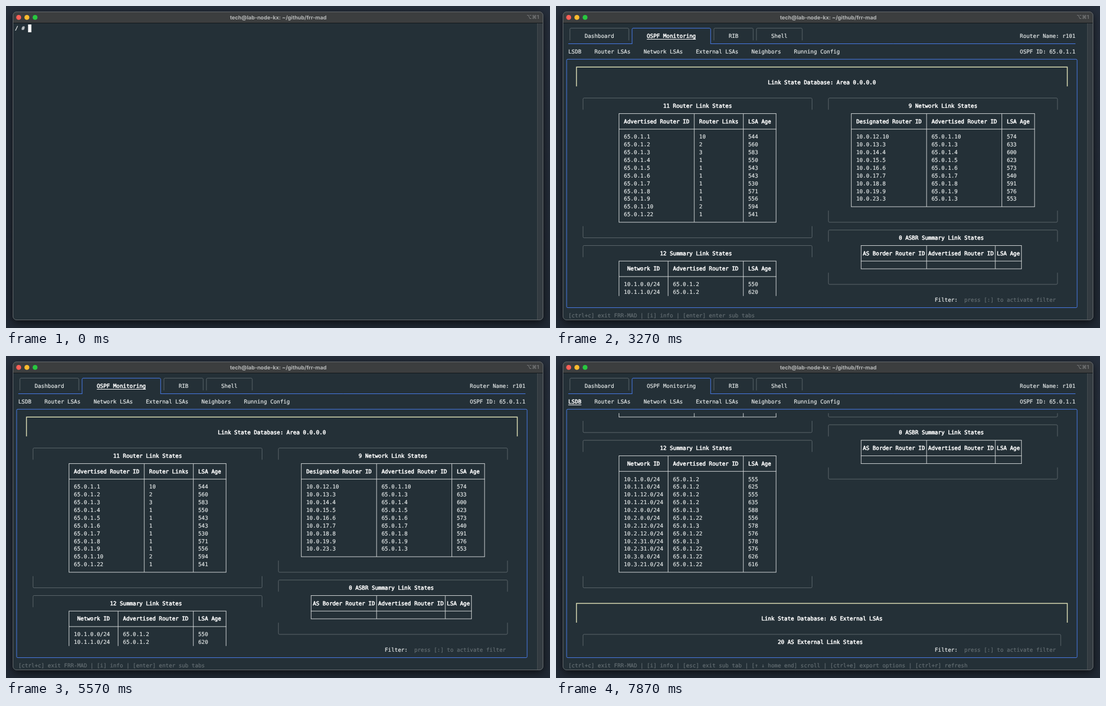
Recreate the animation shown at these times as an HTML page with a canvas. Size 972 by 576 pixels, loop 8 s.

```html
<!DOCTYPE html>
<html lang="en">
<head>
<meta charset="utf-8">
<title>Terminal dashboard</title>
<style>
html, body { margin: 0; width: 100%; height: 100%; overflow: hidden; background: #1c232d; }
canvas { display: block; }
</style>
</head>
<body>
<canvas id="stage" width="972" height="576"></canvas>
<script>
const ctx = document.getElementById('stage').getContext('2d');
const LOOP = 8000;
// The terminal has 8 x 19 point cells, scaled down to the stage
const PT = 972 / 1330;
const CW = 8 * PT, RH = 19 * PT, X0 = 16.1, Y0 = 39.7;
const MONO = '9.75px "DejaVu Sans Mono", monospace';
const C = {
  bg: '#243037', text: '#e6eaea', bold: '#ffffff', dim: '#636d72', box: '#5c666b',
  grid: '#d3d7d8', blue: '#4a7eee', green: '#529f5c', cream: '#dedfb6', row: '#4f92ca'
};
let scroll = 0;

// Terminal cell geometry
const left = c => X0 + c * CW;
const mid = c => left(c + 0.5);
const rowY = r => Y0 + (r - scroll) * RH;
const below = r => rowY(r + 0.5);

// Bold is the regular face with a heavier outline
function text(c, r, str, color = C.text, bold = false, underline = false) {
  const x = left(c), y = rowY(r) + 3.3;
  ctx.font = MONO;
  ctx.letterSpacing = '0px';
  ctx.letterSpacing = (CW - ctx.measureText('M').width) + 'px';
  ctx.fillStyle = ctx.strokeStyle = color;
  ctx.lineWidth = bold ? 0.55 : 0.2;
  ctx.lineJoin = 'round';
  ctx.fillText(str, x, y);
  ctx.strokeText(str, x, y);
  if (underline) ctx.fillRect(x, Math.round(rowY(r) + 5.5), str.length * CW, 1);
}
const head = (c, r, str) => text(c, r, str, C.bold, true);

function line(x1, y1, x2, y2, color) {
  ctx.strokeStyle = color;
  ctx.lineWidth = 1;
  ctx.beginPath();
  ctx.moveTo(x1, y1);
  ctx.lineTo(x2, y2);
  ctx.stroke();
}

// Three-sided frame: an edge at `edge` with legs reaching `end`
function cap(c1, c2, edge, end, color, width = 1, radius = 2) {
  const x1 = mid(c1), x2 = mid(c2);
  ctx.strokeStyle = color;
  ctx.lineWidth = width;
  ctx.lineJoin = 'miter';
  ctx.beginPath();
  ctx.moveTo(x1, end);
  ctx.arcTo(x1, edge, x2, edge, radius);
  ctx.arcTo(x2, edge, x2, end, radius);
  ctx.lineTo(x2, end);
  ctx.stroke();
}
const openBox = (c1, c2, r) => cap(c1, c2, rowY(r), below(r + 1), C.box);
const closeBox = (c1, c2, r) => cap(c1, c2, rowY(r + 1), below(r - 1), C.box);
const banner = (c1, c2, r) => cap(c1, c2, rowY(r), below(r + 2), C.cream, 1.5, 0);

function frame(c1, r1, c2, r2, color, radius) {
  ctx.strokeStyle = color;
  ctx.lineWidth = 1;
  ctx.beginPath();
  ctx.roundRect(mid(c1), rowY(r1), mid(c2) - mid(c1), rowY(r2) - rowY(r1), radius);
  ctx.stroke();
}

function table(cols, top, bottom, open = false) {
  const x1 = mid(cols[0]), x2 = mid(cols[cols.length - 1]);
  const end = open ? below(bottom) : rowY(bottom);
  for (const c of cols) line(mid(c), rowY(top), mid(c), end, C.grid);
  const rules = [rowY(top), rowY(top + 2)];
  if (!open) rules.push(end);
  for (const y of rules) line(x1 - 0.5, y, x2 + 0.5, y, C.grid);
}
const cells = (cols, r, values, draw = text, color) =>
  values.forEach((v, i) => draw(cols[i], r, String(v), color));

function clipBody() {
  ctx.beginPath();
  ctx.rect(16, Y0 + 4.5 * RH, 920, 30 * RH);
  ctx.clip();
}

// Page data
const routerLinks = '1 10 544,2 2 560,3 3 583,4 1 550,5 1 543,6 1 543,7 1 530,8 1 571,9 1 556,10 2 594,22 1 541';
const networkLinks = '12.10 10 574,13.3 3 633,14.4 4 600,15.5 5 623,16.6 6 573,17.7 7 540,18.8 8 591,19.9 9 576,23.3 3 553';
const summaryLinks = '1.0 2 550,1.1 2 620,1.12 2 550,1.21 2 630,2.0 3 583,2.0 22 551,2.12 3 573,2.12 22 571,' +
  '2.31 3 573,2.31 22 571,3.0 22 621,3.21 22 611';
const split = s => s.split(',').map(x => x.split(' '));

const routes = [
  ['0.0.0.0/0', 'kernel', '172.20.20.1 eth0', 'true', 'true', 0, 0, '01:35:55'],
  ...pair('0.0/23', 4, 49, 49),
  ...pair('2.0/24', 3, 52, 52),
  ['10.0.3.0/24', 'ospf', '10.0.12.10 eth2', 'true', 'true', 110, 20, '01:35:08'],
  ...split('12 2 13 54,13 3 11 52,14 6 10 50,15 7 12 53,16 8 13 53,17 9 50 50,18 10 11 51,19 11 54 54')
    .flatMap(([net, eth, a, b]) => pair(net + '.0/24', eth, a, b))
].slice(0, 21);

function pair(net, eth, a, b) {
  const prefix = '10.0.' + net, hop = 'eth' + eth;
  return [
    [prefix, 'ospf', hop, 'false', 'false', 110, 10, '01:35:' + a],
    [prefix, 'connected', hop, 'true', 'true', 0, 0, '01:35:' + b]
  ];
}

function dashboard() {
  frame(3, 5, 112, 7, C.green, 0);
  head(37, 6, 'All OSPF Routes are advertised as Expected');
  banner(113, 153, 5);
  head(125, 7, 'System Resources');
  openBox(115, 151, 9);
  head(128, 10, 'CPU Metrics');
  ['CPU Usage: 7.47%', 'Cores: 16', 'Memory Usage: 16.97%'].forEach((s, i) => text(118, 12 + i, s));
  banner(113, 153, 16);
  head(121, 18, 'General OSPF Information');
  ['OSPF Router ID: 65.0.1.1', 'Router Type: ASBR', 'Last SPF Execution: 1h34m42s',
    'Total External LSAs: 20', 'Attached Areas: 1'].forEach((s, i) => text(116, 20 + i, s));
  openBox(115, 151, 26);
  head(127, 27, 'Area 0.0.0.0');
  ['Full Adjencencies: 9', 'Total LSAs: 32', 'Router LSAs: 11', 'Network LSAs: 9', 'Summary LSAs: 12',
    'ASBR Summary LSAs: 0', 'NSSA External LSAs: 0'].forEach((s, i) => text(118, 28 + i, s));
}

function database(age) {
  banner(3, 153, 5);
  head(62, 7, 'Link State Database: Area 0.0.0.0');

  openBox(5, 75, 9);
  head(30, 10, '11 Router Link States');
  table([16, 39, 54, 64], 11, 25);
  cells([18, 41, 56], 12, ['Advertised Router ID', 'Router Links', 'LSA Age'], head);
  split(routerLinks).forEach(([id, n, a], i) => cells([18, 41, 56], 14 + i, ['65.0.1.' + id, n, +a + age]));
  closeBox(5, 75, 26);

  openBox(5, 75, 28);
  head(29, 29, '12 Summary Link States');
  table([16, 31, 54, 64], 30, 45);
  cells([19, 33, 56], 31, ['Network ID', 'Advertised Router ID', 'LSA Age'], head);
  split(summaryLinks).forEach(([net, id, a], i) =>
    cells([18, 33, 56], 33 + i, [`10.${net}.0/24`, '65.0.1.' + id, +a + age]));
  closeBox(5, 75, 46);

  openBox(80, 150, 9);
  head(105, 10, '9 Network Link States');
  table([87, 110, 133, 143], 11, 23);
  cells([89, 112, 135], 12, ['Designated Router ID', 'Advertised Router ID', 'LSA Age'], head);
  split(networkLinks).forEach(([net, id, a], i) =>
    cells([89, 112, 135], 14 + i, ['10.0.' + net, '65.0.1.' + id, +a + age]));
  closeBox(80, 150, 24);

  openBox(80, 150, 26);
  head(102, 27, '0 ASBR Summary Link States');
  table([90, 110, 131, 139], 28, 31);
  cells([91, 111, 132], 29, ['AS Border Router ID', 'Advertised Router ID', 'LSA Age'], head);
  closeBox(80, 150, 32);

  banner(3, 153, 49);
  head(60, 51, 'Link State Database: AS External LSAs');
  openBox(5, 151, 53);
  head(65, 54, '20 AS External Link States');
}

function rib() {
  banner(3, 153, 5);
  head(56, 7, 'Routing Information Base - 56 Received Routes');
  table([24, 45, 57, 79, 87, 99, 110, 119, 130], 9, 32, true);
  cells([32, 47, 64, 82, 89, 101, 112, 122], 10,
    ['Prefix', 'Protocol', 'Next Hops', 'FIB', 'Installed', 'Distance', 'Metric', 'Uptime'], head);
  routes.forEach((r, i) =>
    cells([26, 47, 59, 81, 89, 101, 112, 121], 12 + i, r, text, i % 2 ? '#f6f8f8' : C.row));
  cap(3, 153, rowY(34), below(32), C.cream, 1.5, 0);
}

const tabs = [
  { name: 'Dashboard', from: 1, to: 19, subs: ['Anomalies', 'OSPF'], page: dashboard },
  { name: 'OSPF Monitoring', from: 20, to: 44, page: database,
    subs: ['LSDB', 'Router LSAs', 'Network LSAs', 'External LSAs', 'Neighbors', 'Running Config'] },
  { name: 'RIB', from: 45, to: 57, page: rib,
    subs: ['RIB', 'FIB', 'RIB-OSPF', 'RIB-BGP', 'RIB-Connected', 'RIB-Static'] },
  { name: 'Shell', from: 58, to: 72 }
];

function app({ tab, entered = false, offset = 0, age = 0 }) {
  const active = tabs[tab], base = rowY(2);
  for (const t of tabs) {
    const on = t === active, lit = on && !entered;
    cap(t.from, t.to, rowY(0), on ? base + 0.5 : below(1) + 1, on ? C.blue : C.box);
    text(t.from + 5, 1, t.name, lit ? C.bold : C.text, lit, lit);
  }
  line(left(1), base, mid(active.from), base, C.blue);
  line(mid(active.to), base, left(156), base, C.blue);
  text(139, 1, 'Router Name: r101');
  text(139, 3, 'OSPF ID: 65.0.1.1');
  let c = 1;
  active.subs.forEach((s, i) => {
    const lit = entered && i === 0;
    text(c, 3, s, lit ? C.bold : C.text, lit, lit);
    c += s.length + 4;
  });
  frame(0, 4, 156, 36, C.blue, 2);

  ctx.save();
  clipBody();
  scroll = offset;
  active.page(age);
  scroll = 0;
  ctx.restore();

  text(113, 35, 'Filter:');
  text(122, 35, 'press [:] to activate filter', C.dim);
  text(1, 37, entered
    ? '[ctrl+c] exit FRR-MAD | [i] info | [esc] exit sub tab | [↑ ↓ home end] scroll | [ctrl+e] export options | [ctrl+r] refresh'
    : '[ctrl+c] exit FRR-MAD | [i] info | [enter] enter sub tabs', C.dim);
}

function cursor(c, r) {
  ctx.fillStyle = '#fff';
  ctx.fillRect(left(c), Math.round(rowY(r) - 6.6), CW, 14);
}

function prompt(t) {
  const typed = t < 1130 ? 0 : t < 1370 ? 1 : Math.min(7, 2 + Math.floor((t - 1370) / 60));
  text(0, 0, '/ # ' + 'frr-mad'.slice(0, typed), '#f6f8f8');
  if (t < 2070) cursor(4 + typed, 0);
  else cursor(0, 1);
}

function windowFrame() {
  const sky = ctx.createLinearGradient(0, 0, 0, 576);
  sky.addColorStop(0, '#262e3b');
  sky.addColorStop(1, '#202833');
  ctx.fillStyle = sky;
  ctx.fillRect(0, 0, 972, 576);

  ctx.save();
  ctx.shadowColor = 'rgba(0,0,0,.65)';
  ctx.shadowBlur = 16;
  ctx.shadowOffsetY = 4;
  ctx.fillStyle = C.bg;
  ctx.beginPath();
  ctx.roundRect(12, 10, 948, 552, 7);
  ctx.fill();
  ctx.restore();

  ctx.save();
  ctx.clip();
  ctx.fillStyle = '#3c3e3f';
  ctx.fillRect(12, 10, 948, 20);
  ctx.fillStyle = '#11171a';
  ctx.fillRect(12, 30, 948, 1);
  ctx.fillStyle = '#333b41';
  ctx.fillRect(949, 31, 11, 531);
  ctx.fillStyle = '#454c51';
  ctx.fillRect(949, 31, 1, 531);
  ctx.restore();

  ctx.strokeStyle = '#666b6e';
  ctx.lineWidth = 1;
  ctx.beginPath();
  ctx.roundRect(12.5, 10.5, 947, 551, 6.5);
  ctx.stroke();

  ['#ff5f57', '#febc2e', '#28c840'].forEach((color, i) => {
    ctx.fillStyle = color;
    ctx.beginPath();
    ctx.arc(22.7 + i * 20 * PT, 20.4, 6 * PT, 0, 7);
    ctx.fill();
  });

  ctx.letterSpacing = '0px';
  ctx.textAlign = 'center';
  ctx.font = '700 9.5px Inter, sans-serif';
  ctx.fillStyle = '#b7b9b9';
  ctx.fillText('tech@lab-node-kx: ~/github/frr-mad', 486.5, 23.5);
  ctx.textAlign = 'right';
  ctx.font = '600 9.3px Inter, "DejaVu Sans", sans-serif';
  ctx.fillStyle = '#7b7d7e';
  ctx.fillText('⌥⌘1', 952.5, 23.3);
  ctx.textAlign = 'left';
}

const scenes = [
  [2230, { tab: 0 }],
  [3270, { tab: 1 }],
  [4330, { tab: 2 }],
  [5570, { tab: 1 }],
  [6570, { tab: 1, entered: true }],
  [7530, { tab: 1, entered: true, offset: 10, age: 5 }],
  [7870, { tab: 1, entered: true, offset: 20, age: 5 }]
];

function draw(t) {
  windowFrame();
  const scene = scenes.filter(([start]) => t >= start).pop();
  if (scene) app(scene[1]);
  else if (t < 2130) prompt(t);
}

ctx.textRendering = 'geometricPrecision';
const begin = performance.now();
function tick() {
  draw((performance.now() - begin) % LOOP);
  requestAnimationFrame(tick);
}
tick();
</script>
</body>
</html>
```
